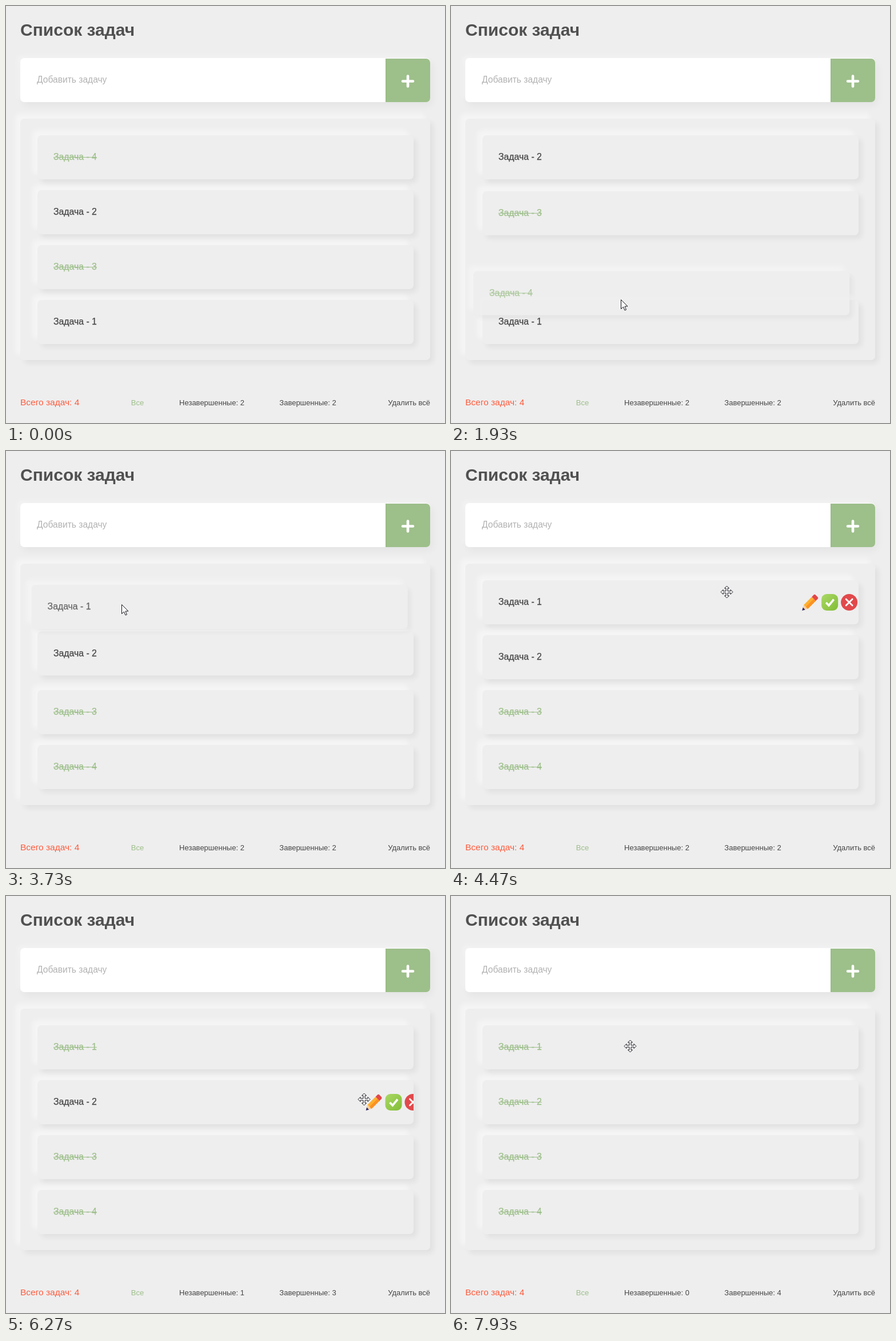
These frames come from a looping animation (768 px wide and 729 px high, 8000 ms). An HTML page:

```html
<!DOCTYPE html>
<html lang="ru">
<head>
<meta charset="utf-8">
<title>Список задач</title>
<style>
html, body { margin: 0; width: 100%; height: 100%; overflow: hidden; background: #eee; }
body { position: relative; font-family: "Liberation Sans", Arial, sans-serif; }
div, svg { position: absolute; }
.field, .panel, .task { border-radius: 7px; box-shadow: 6px 6px 10px rgba(0,0,0,.055), -9px -9px 9px rgba(255,255,255,.42); }
.field { left: 25px; top: 91px; width: 717px; height: 77px; background: #fff; box-shadow: 4px 6px 14px rgba(0,0,0,.045), -5px -5px 9px rgba(255,255,255,.3); }
.add { left: 664px; top: 91.6px; width: 77px; height: 76.4px; background: #9dbf8a; border-left: 1px solid #95b881; border-radius: 0 7px 7px 0; }
.panel { left: 25px; top: 197px; width: 717px; height: 422px; }
.task { left: 55px; top: 226px; width: 658px; height: 76.5px; overflow: hidden; background: #eee; font-size: 15.8px; line-height: 75px; color: #454545; -webkit-text-stroke: .25px; }
.task span { position: absolute; left: 28px; white-space: pre; }
.task svg { left: 546px; top: 24px; width: 98px; height: 30px; }
.done span { color: #9dbf8a; text-decoration: line-through; }
#over { left: 0; top: 0; z-index: 9; }
</style>
</head>
<body>
<div class="field"></div>
<div class="add"></div>
<div class="panel"></div>

<svg id="over" width="768" height="729" font-size="13" fill="#454545">
  <defs>
    <linearGradient id="lime" x2="1" y2="1">
      <stop stop-color="#aad866"/><stop offset="1" stop-color="#82bd35"/>
    </linearGradient>
    <g id="pencil">
      <path d="M0 29 3 19 10 26Z" fill="#f6cfa0"/>
      <path d="M0 29 1.6 23.5 5.5 27.4Z" fill="#2c2a6b"/>
      <path d="M17 5 24 12 10 26 3 19Z" fill="#ffb02e"/>
      <path d="M20.5 8.5 24 12 10 26 6.5 22.5Z" fill="#fb9224"/>
      <path d="M17 5 20.4 1.6Q22 0 23.6 1.6L27.4 5.4Q29 7 27.4 8.6L24 12Z" fill="#e2474a"/>
    </g>
    <g id="check">
      <rect width="29" height="29" rx="9" fill="url(#lime)"/>
      <path d="M8 15 12.8 20 21.5 9.5" fill="none" stroke="#fff" stroke-width="3.6"/>
    </g>
    <g id="cross">
      <circle cx="14.5" cy="14.5" r="14.5" fill="#e1494b"/>
      <path d="M9 9 20 20M20 9 9 20" stroke="#fff" stroke-width="2.8" stroke-linecap="round"/>
    </g>
  </defs>
  <text x="25" y="52" font-size="30" font-weight="bold" fill="#505050">Список задач</text>
  <text x="54" y="134" font-size="15.6" fill="#b2b2b2">Добавить задачу</text>
  <path d="M703 122.5V140.5M694 131.5H712" stroke="#fff" stroke-width="4.6" stroke-linecap="round"/>
  <text x="25" y="698" font-size="15.5" fill="#ff5a3c">Всего задач: 4</text>
  <text x="230" y="698" text-anchor="middle" fill="#9dbf8a">Все</text>
  <text id="open" x="360" y="698" text-anchor="middle"></text>
  <text id="closed" x="528" y="698" text-anchor="middle"></text>
  <text x="742" y="698" text-anchor="end">Удалить всё</text>
  <path id="cursor" fill="#fff" stroke="#16161e" stroke-linejoin="round"/>
</svg>

<script>
const LOOP = 8000, DT = 5, ENTER = 270;
const TOP = 226, ROW = 76.5, STEP = 96;
const ICON_X = 601, ICON_STEP = 34, HIDDEN = 114;
const HOVER_WAIT = 160, SLIDE = 280, FADE = 200, SETTLE = 72;

// Pointer stops: [arrive, leave, x, y]
const stops = [
  [0, ENTER, 729, 228], [1070, 1330, 313, 275], [2300, 2400, 293, 573], [2670, 2670, 226, 484],
  [2900, 3070, 212, 452], [3870, 4130, 201, 257], [4600, 4870, 520, 245], [5330, 5720, 652, 265],
  [6270, 6270, 626, 355], [6670, 6870, 652, 361], [7150, 7730, 310, 406], [7930, LOOP, 313, 262]
];
const drags = [[1330, 2400], [2950, 4130]];
const clicks = [5600, 6870];

const shapes = {
  arrow: 'M0 0V16L4 12.5 6.5 18.5 9 17.5 6.5 11.5H11.5Z',
  move: 'M0-10.5 4-6.5H1.5V-1.5H6.5V-4L10.5 0 6.5 4V1.5H1.5V6.5H4L0 10.5-4 6.5H-1.5V1.5H-6.5V4L-10.5 0-6.5-4V-1.5H-1.5V-6.5H-4Z',
  hand: 'M-2 1.5Q0-1 2 1.5V7Q4 5.5 5 7.5 7 6.5 7.5 8.5 9.5 8 9.5 10.5V14Q9 17 7.5 18V21H-2.5V18.5Q-5 15-7 12.5-7.5 9.5-4.5 10.5L-2 12.5Z'
};

const $ = id => document.getElementById(id);
const clamp = v => Math.min(1, Math.max(0, v));
const toward = (v, on, time) => clamp(v + (on ? DT : -DT) / time);
const slideShift = p => HIDDEN * (1 - p) ** 2;

function pointer(t) {
  const i = stops.findLastIndex(s => s[0] <= t);
  const [, leave, x, y] = stops[i], next = stops[i + 1];
  if (t <= leave || !next) return [x, y];
  const k = 1 - (1 - (t - leave) / (next[0] - leave)) ** 1.65;
  return [x + (next[2] - x) * k, y + (next[3] - y) * k];
}

// Slot under the pointer, or -1
function slotAt(x, y) {
  const slot = Math.floor((y - TOP) / STEP);
  return x > 55 && x < 713 && slot >= 0 && slot < 4 && y - TOP - slot * STEP < ROW ? slot : -1;
}

function iconAt(task, x, y) {
  const i = Math.floor((x - ICON_X - slideShift(task.shown)) / ICON_STEP);
  return task.shown && i < 3 && Math.abs(y - TOP - task.y - 38) < 15 ? i : -1;
}

// Replays the session from its beginning up to time "end"
function simulate(end) {
  const order = [4, 2, 3, 1].map((n, slot) =>
    ({ n, y: slot * STEP, done: n > 2, hover: 0, shown: 0, dim: [0, 0, 0] }));
  const state = { order, held: null, grab: null, shape: 'arrow' };

  for (let t = ENTER; t <= end; t += DT) {
    const [x, y] = pointer(t), slot = slotAt(x, y);
    const dragging = drags.some(([from, to]) => t >= from && t < to);

    if (dragging && !state.held) {
      state.held = order[slot];
      state.grab = [x, y, state.held.y];
    }
    if (!dragging) state.held = null;
    const held = state.held;
    if (held && slot >= 0) {
      order.splice(order.indexOf(held), 1);
      order.splice(slot, 0, held);
    }

    const over = held ? null : order[slot];
    if (over && clicks.includes(t)) over.done = true;
    const icon = over ? iconAt(over, x, y) : -1;

    order.forEach((task, i) => {
      const gap = i * STEP - task.y;
      task.y += task === held ? gap : gap * (1 - Math.exp(-DT / SETTLE));
      task.hover = task === over ? task.hover + DT : 0;
      task.shown = task === held ? 0 : toward(task.shown, task.hover > HOVER_WAIT, SLIDE);
      task.dim = task.dim.map((d, k) => toward(d, task === over && k === icon, FADE));
    });

    const lifted = held && (x !== state.grab[0] || y !== state.grab[1]);
    state.shape = lifted || slot < 0 ? 'arrow' : icon >= 0 ? 'hand' : 'move';
  }
  return state;
}

const rows = [1, 2, 3, 4].map(n => {
  const el = document.createElement('div');
  el.className = 'task';
  const icons = ['pencil', 'check', 'cross'].map((id, i) => `<use href="#${id}" x="${i * ICON_STEP}"/>`);
  el.innerHTML = `<span>Задача - ${n}</span><svg viewBox="0 0 98 30">${icons.join('')}</svg>`;
  document.body.append(el);
  return { el, bar: el.querySelector('svg'), icons: el.querySelectorAll('use') };
});

function draw(t) {
  const { order, held, grab, shape } = simulate(t), [px, py] = pointer(t);

  for (const task of order) {
    const { el, bar, icons } = rows[task.n - 1], lift = task === held;
    const x = lift ? px - grab[0] : 0, y = lift ? grab[2] + py - grab[1] : task.y;
    el.style.transform = `translate(${x}px, ${y}px)`;
    el.style.opacity = lift ? .8 : 1;
    el.style.zIndex = lift ? 2 : 1;
    el.classList.toggle('done', task.done);
    bar.style.transform = `translateX(${slideShift(task.shown)}px)`;
    bar.style.visibility = task.shown ? 'visible' : 'hidden';
    icons.forEach((icon, i) => icon.style.opacity = 1 - task.dim[i] / 2);
  }

  const done = order.filter(task => task.done).length;
  $('open').textContent = 'Незавершенные: ' + (4 - done);
  $('closed').textContent = 'Завершенные: ' + done;
  $('cursor').setAttribute('d', shapes[shape]);
  $('cursor').setAttribute('transform', `translate(${Math.round(px) + .5} ${Math.round(py) + .5})`);
  $('cursor').style.display = t < ENTER ? 'none' : '';
}

const start = performance.now();
function frame() {
  draw((performance.now() - start) % LOOP);
  requestAnimationFrame(frame);
}
frame();
</script>
</body>
</html>
```
